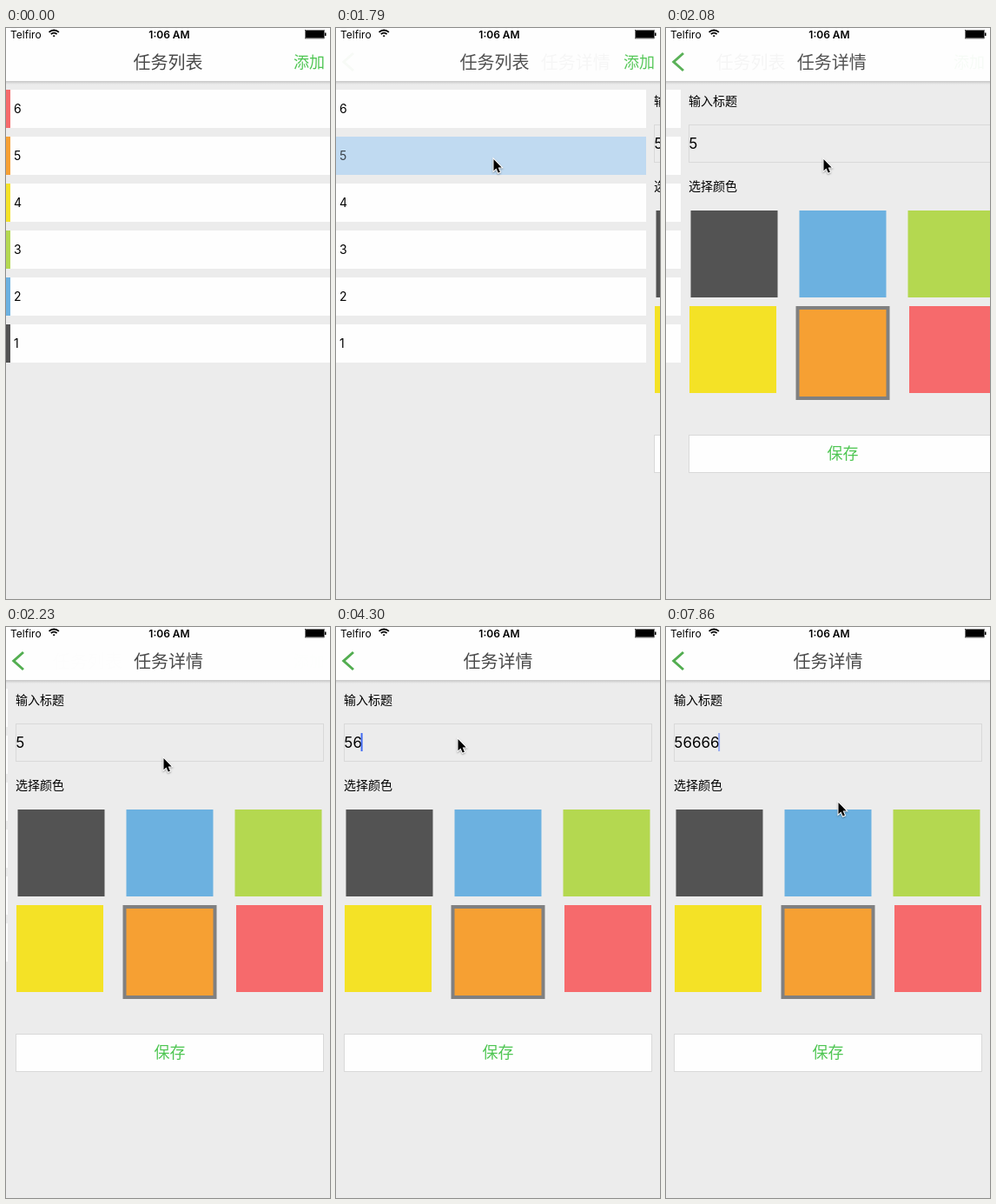
An HTML page with a canvas for the animation above (8 s loop, 373 by 657 pixels).

```html
<!DOCTYPE html>
<html lang="zh">
<head>
<meta charset="utf-8">
<style>
  html, body { margin: 0; width: 100%; height: 100%; overflow: hidden; background: #ececec; }
  canvas { display: block; width: 373px; height: 657px; }
</style>
</head>
<body>
<canvas></canvas>
<script>
const W = 373, H = 657, LOOP = 8000;
const TICK = 148.12; // the screen refreshes in coarse steps of this many ms
const PUSH_START = 12, FOCUS = 21, KEY_PRESSES = [29, 45, 48, 49];

const canvas = document.querySelector('canvas');
const ctx = canvas.getContext('2d');
const ratio = window.devicePixelRatio || 1;
canvas.width = W * ratio;
canvas.height = H * ratio;

const CJK = '"Noto Sans CJK SC", "Noto Sans CJK", sans-serif';
const LATIN = 'Inter, sans-serif';
const GREEN = '#4fc653', BACK = '#ececec', PAPER = '#fefefe';
const COLORS = ['#535353', '#6cb1e0', '#b4d850', '#f4e226', '#f6a033', '#f66a6c'];

const clamp = v => Math.min(1, Math.max(0, v));
const easeInOut = u => u * u * (3 - 2 * u);
const easeOut = u => 1 - (1 - u) ** 1.6;

// Critically damped spring: share of the way still to go
function pushRemaining(tick) {
  if (tick < PUSH_START) return 1;
  const a = .325 + 2.26 * (tick - PUSH_START);
  return (1 + a) * Math.exp(-a);
}

// The blink restarts at every key press and repeats about once a second
function caretAlpha(tick, lastPress) {
  if (tick < FOCUS) return 0;
  const age = Math.max(2, tick - lastPress);
  return clamp(.8 + 2 * Math.cos(2 * Math.PI * (age - 2.15) / 6.75));
}

function pointerAt(tick) {
  let x = 228, y = 207;
  const glide = (from, to, toX, toY, ease) => {
    const u = ease(clamp((tick - from) / (to - from)));
    x += (toX - x) * u;
    y += (toY - y) * u;
  };
  glide(5, 9, 181.5, 151, easeOut);
  glide(15, 17, 140.5, 129, easeInOut);
  glide(50, 53, 198.5, 202, easeInOut);
  return [x, y];
}

function box(x, y, w, h, color) {
  ctx.fillStyle = color;
  ctx.fillRect(x, y, w, h);
}

function text(str, x, y, size, color, family = CJK, align = 'left', weight = 400) {
  ctx.font = `${weight} ${size}px ${family}`;
  ctx.textAlign = align;
  ctx.fillStyle = color;
  ctx.fillText(str, x, y);
}

function outline(x, y, w, h) {
  ctx.strokeStyle = '#d9d9d9';
  ctx.lineWidth = 1;
  ctx.strokeRect(x + .5, y + .5, w - 1, h - 1);
}

function faded(alpha, draw) {
  ctx.save();
  ctx.globalAlpha = alpha;
  draw();
  ctx.restore();
}

function shifted(x, draw) {
  ctx.save();
  ctx.translate(x, 0);
  draw();
  ctx.restore();
}

function listPage(selected) {
  for (let i = 0; i < 6; i++) {
    const y = 71 + 54 * i, lit = selected && i === 1;
    box(0, y, W, 44, lit ? '#c0daf1' : PAPER);
    box(0, y, 5, 44, COLORS[5 - i]);
    text(6 - i, 9, y + 27, 14, lit ? '#3c444b' : '#000', LATIN);
  }
}

function detailPage(tick) {
  const presses = KEY_PRESSES.filter(press => press <= tick);
  const value = '5' + '6'.repeat(presses.length);
  const lastPress = presses.at(-1) ?? FOCUS - 2;

  box(0, 61, W, H, BACK);
  text('输入标题', 9, 89, 14, '#000');
  outline(9, 111, 355, 44);
  text(value, 9.3, 139, 17, '#000', LATIN);
  faded(caretAlpha(tick, lastPress),
    () => box(7.6 + 10.5 * value.length, 122, 2, 21, '#426bf2'));

  text('选择颜色', 9, 187, 14, '#000');
  box(132.5, 320, 108, 108, '#808080');
  for (let i = 0; i < 3; i++) {
    box(11.5 + 125 * i, 210, 100, 100, COLORS[i]);
    box(10 + 126.5 * i, i === 1 ? 324 : 320, 100, 100, COLORS[i + 3]);
  }

  box(9, 468, 355, 44, PAPER);
  outline(9, 468, 355, 44);
  text('保存', 186.5, 496, 18, GREEN, CJK, 'center');
}

function statusBar() {
  text('Telfiro', 5, 11.5, 12, '#000', LATIN);
  text('1:06 AM', 188, 11.5, 12, '#000', LATIN, 'center', 600);
  ctx.strokeStyle = '#000';
  ctx.lineWidth = 1.8;
  for (const r of [1.2, 4.8, 8]) {
    ctx.beginPath();
    ctx.arc(55.2, 10.5, r, -Math.PI * .75, -Math.PI * .25);
    ctx.stroke();
  }
  ctx.lineWidth = .5;
  ctx.strokeRect(344.5, 2.5, 22, 9.5);
  box(345, 3, 21, 8.5, '#000');
  box(367, 5.5, 1.5, 3.5, '#000');
}

function chevron() {
  ctx.beginPath();
  ctx.moveTo(20, 29);
  ctx.lineTo(8.8, 39);
  ctx.lineTo(20, 49);
  ctx.strokeStyle = '#52ad50';
  ctx.lineWidth = 3;
  ctx.stroke();
}

function header(remaining) {
  const shadow = ctx.createLinearGradient(0, 61, 0, 65);
  shadow.addColorStop(0, 'rgba(0,0,0,.16)');
  shadow.addColorStop(1, 'rgba(0,0,0,0)');
  box(0, 61, W, 4, shadow);
  box(0, 0, W, 61, PAPER);
  statusBar();
  const title = (str, offset) =>
    text(str, 186.5 + offset * W / 4, 47, 20, '#484848', CJK, 'center');
  faded(remaining, () => {
    title('任务列表', remaining - 1);
    text('添加', 331, 46, 18, GREEN);
  });
  faded(1 - remaining, () => {
    title('任务详情', remaining);
    chevron();
  });
}

function pointer(x, y) {
  ctx.save();
  ctx.translate(x, y);
  ctx.beginPath();
  [[0, 0], [0, 13.2], [3, 10.4], [5.2, 15.6], [7.4, 14.7], [5.2, 9.6], [9.2, 9.4]]
    .forEach(p => ctx.lineTo(...p));
  ctx.closePath();
  ctx.strokeStyle = '#fff';
  ctx.lineWidth = 2;
  ctx.shadowColor = 'rgba(0,0,0,.35)';
  ctx.shadowBlur = 2;
  ctx.shadowOffsetY = 1;
  ctx.stroke();
  ctx.shadowColor = 'transparent';
  ctx.fillStyle = '#000';
  ctx.fill();
  ctx.restore();
}

function render(tick) {
  ctx.setTransform(ratio, 0, 0, ratio, 0, 0);
  box(0, 0, W, H, BACK);
  const remaining = pushRemaining(tick);
  const detailX = Math.round(W * remaining);
  shifted(Math.round(-.3 * (W - detailX)), () => listPage(tick === PUSH_START));
  shifted(detailX, () => detailPage(tick));
  header(remaining);
  if (tick >= 5) pointer(...pointerAt(tick));
}

function play() {
  render(Math.floor(performance.now() % LOOP / TICK));
  requestAnimationFrame(play);
}
play();
</script>
</body>
</html>
```
